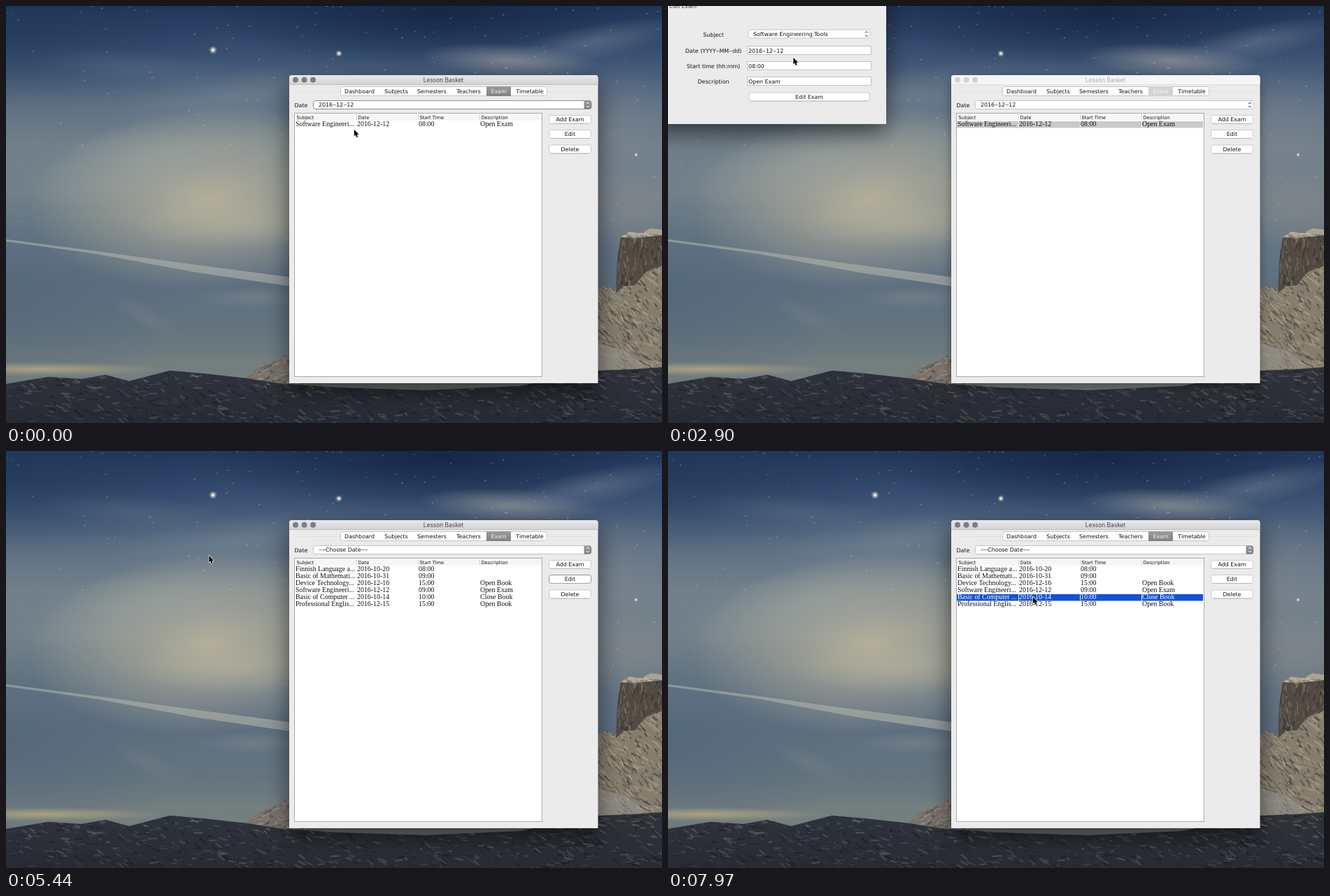
Recreate the animation shown at these times as an HTML page with a canvas. Size 938 by 597 pixels, loop 8000 ms.

```html
<!DOCTYPE html>
<html lang="en">
<head>
<meta charset="utf-8">
<title>Exam planner</title>
<style>
html, body { margin: 0; width: 100%; height: 100%; overflow: hidden; background: #24395a; }
canvas { display: block; width: 938px; height: 597px; }
</style>
</head>
<body>
<canvas id="stage" width="938" height="597"></canvas>
<script>
const W = 938, H = 597, LOOP = 8000;
const stage = document.getElementById('stage');
let ctx = stage.getContext('2d');

const UI = '7.9px "DejaVu Sans", sans-serif';
const HEAD = '6.7px "DejaVu Sans", sans-serif';
const CELL = '9.9px "Liberation Serif", serif';
const TITLE = '8.4px Inter, sans-serif';
const COLS = [414, 502, 590, 678];

const ENGINEERING = ['Software Engineeri...', '2016-12-12', '08:00', 'Open Exam'];
const ALL_EXAMS = [
  ['Finnish Language a...', '2016-10-20', '08:00', ''],
  ['Basic of Mathemati...', '2016-10-31', '09:00', ''],
  ['Device Technology...', '2016-12-16', '15:00', 'Open Book'],
  ['Software Engineeri...', '2016-12-12', '09:00', 'Open Exam'],
  ['Basic of Computer ...', '2016-10-14', '10:00', 'Close Book'],
  ['Professional Englis...', '2016-12-15', '15:00', 'Open Book']
];

// time, x, y, and whether the pointer glides on to the next entry
const POINTER = [
  [0, 497.5, 177], [60, 498, 176], [230, 500, 171], [590, 500, 171, 1],
  [1150, 808, 183], [1430, 620, 170], [1610, 157, 104], [1790, 138, 98, 1],
  [2080, 127, 82], [2610, 127, 80, 1], [2900, 179, 74], [3200, 179, 74, 1],
  [3500, 185, 72, 1], [3840, 184, 73], [4080, 184, 73, 1], [4600, 217, 134, 1],
  [4850, 217.5, 131], [5440, 290, 150, 1], [5550, 552, 219], [5730, 553, 215, 1],
  [6050, 572, 195, 1], [6300, 562, 177, 1], [6490, 558, 181], [6550, 558, 180],
  [6850, 557, 173], [6960, 556, 171], [7110, 556, 171, 1], [7740, 522, 204],
  [7920, 521.5, 206], [7970, 521.5, 209]
];

const between = (t, a, b) => t >= a && t < b;

function random(seed) {
  return () => (seed = (seed * 16807) % 2147483647) / 2147483647;
}

function poly(points) {
  ctx.beginPath();
  points.forEach(([x, y]) => ctx.lineTo(x, y));
  ctx.closePath();
}

function vertical(y0, y1, ...colors) {
  const g = ctx.createLinearGradient(0, y0, 0, y1);
  colors.forEach((c, i) => g.addColorStop(i / (colors.length - 1), c));
  return g;
}

function glow(x, y, rx, ry, rgb, alpha, tilt = 0) {
  ctx.save();
  ctx.translate(x, y);
  ctx.rotate(tilt);
  ctx.scale(rx, ry);
  const g = ctx.createRadialGradient(0, 0, 0, 0, 0, 1);
  g.addColorStop(0, `rgba(${rgb},${alpha})`);
  g.addColorStop(0.5, `rgba(${rgb},${alpha * 0.5})`);
  g.addColorStop(1, `rgba(${rgb},0)`);
  ctx.fillStyle = g;
  ctx.fillRect(-1, -1, 2, 2);
  ctx.restore();
}

// Fills an outline and roughens it with short slanted strokes
function rock(points, base, tones, box, count, slope, seed) {
  const rnd = random(seed), [x, y, w, h] = box;
  ctx.save();
  poly(points);
  ctx.fillStyle = base;
  ctx.fill();
  ctx.clip();
  ctx.globalAlpha = 0.55;
  for (let i = 0; i < count; i++) {
    const px = x + rnd() * w, py = y + rnd() * h, len = 3 + rnd() * 11;
    const a = slope + (rnd() - 0.5) * 0.9;
    ctx.strokeStyle = tones[Math.floor(rnd() * tones.length)];
    ctx.lineWidth = 0.7 + rnd() * 2;
    ctx.beginPath();
    ctx.moveTo(px, py);
    ctx.lineTo(px + Math.cos(a) * len, py + Math.sin(a) * len);
    ctx.stroke();
  }
  ctx.restore();
}

function paintSky() {
  ctx.fillStyle = vertical(0, H, '#21375a', '#385072', '#5b6e82', '#71808a',
    '#72808a', '#657684', '#5e6f80', '#64747f', '#75807f', '#6d7472');
  ctx.fillRect(0, 0, W, H);
  glow(0, 30, 330, 120, '30,54,86', 0.6);
  glow(620, 10, 330, 80, '18,35,66', 0.8);
  glow(0, 420, 260, 150, '75,96,118', 0.5);
  glow(290, 275, 260, 130, '190,183,157', 0.85, -0.08);
  glow(225, 215, 210, 60, '157,164,161', 0.5, -0.2);
  glow(330, 310, 150, 38, '196,188,160', 0.4);
  glow(330, 130, 190, 40, '125,140,151', 0.45, -0.15);
  glow(190, 90, 150, 28, '86,106,131', 0.5, 0.1);
  glow(720, 78, 130, 24, '158,159,156', 0.65, 0.05);
  glow(840, 52, 130, 26, '112,126,145', 0.55, -0.2);
  glow(880, 180, 120, 90, '125,132,144', 0.5);
  glow(900, 290, 110, 60, '142,141,137', 0.5);
  glow(350, 418, 80, 16, '135,143,147', 0.4);
  glow(200, 445, 60, 18, '128,137,143', 0.3, 0.5);
  glow(50, 520, 180, 10, '193,174,132', 0.75);
  glow(300, 508, 170, 12, '132,133,124', 0.4);

  poly([[0, 334], [130, 351], [260, 369], [405, 388], [405, 401], [270, 381], [130, 355], [0, 337]]);
  ctx.fillStyle = 'rgba(176,178,171,0.6)';
  ctx.fill();

  const rnd = random(77);
  for (let i = 0; i < 190; i++) {
    const x = rnd() * W, y = rnd() ** 1.7 * 340;
    ctx.strokeStyle = `rgba(220,226,230,${0.2 + rnd() * 0.5})`;
    ctx.lineWidth = 0.8;
    ctx.beginPath();
    ctx.moveTo(x, y);
    ctx.lineTo(x + 2.5, y - 1.2);
    ctx.stroke();
  }
  [[296, 63, 6], [476, 68, 5], [901, 213, 3]].forEach(([x, y, r]) => {
    glow(x, y, r, r, '245,235,215', 0.9);
    glow(x, y, r / 2, r / 2, '255,250,240', 1);
  });
}

function paintMountains() {
  rock([[340, 535], [364, 516], [385, 508], [405, 497], [450, 500], [450, 550], [340, 550]],
    '#77716a', ['#a39a87', '#403f42', '#8e8679'], [340, 497, 90, 50], 130, -0.5, 5);
  rock([[840, 403], [850, 405], [857, 399], [870, 408], [892, 372], [938, 350], [938, 560], [840, 560]],
    '#857d6d', ['#bbae91', '#3b3837', '#a39981', '#55504b'], [840, 350, 98, 180], 480, 0.75, 21);
  rock([[879, 330], [891, 323], [908, 325], [922, 318], [938, 320], [938, 372],
    [914, 381], [899, 400], [884, 401], [872, 411], [874, 365]],
    '#514a43', ['#8f7f66', '#2d2a2b', '#6d6252'], [870, 328, 68, 85], 150, 1.6, 12);
  rock([[878, 331], [891, 323], [908, 325], [922, 318], [938, 320], [938, 328], [900, 332]],
    '#a9a294', ['#cbc2ae', '#686159'], [876, 318, 62, 14], 24, 0.2, 9);
  rock([[846, 482], [884, 494], [918, 517], [846, 522]],
    '#8e8a81', ['#aaa393', '#6d6962'], [846, 482, 70, 40], 35, 0.6, 4);
  rock([[0, 541], [60, 531], [108, 534], [142, 528], [176, 537], [234, 522], [282, 526],
    [345, 533], [390, 540], [470, 546], [600, 550], [735, 544], [800, 531], [846, 522],
    [900, 520], [938, 517], [938, 597], [0, 597]],
    '#2e323a', ['#5c626a', '#171a21', '#474c54', '#23272e', '#747675'], [0, 518, W, 79], 1050, 0.3, 33);
  ctx.fillStyle = vertical(530, H, 'rgba(20,23,30,0)', 'rgba(20,23,30,0.28)');
  ctx.fillRect(0, 530, W, H - 530);
}

function makeBackdrop() {
  const sheet = document.createElement('canvas'), main = ctx;
  sheet.width = W;
  sheet.height = H;
  ctx = sheet.getContext('2d');
  paintSky();
  paintMountains();
  ctx = main;
  return sheet;
}

// The interface font has a hyphen as wide as a digit
function text(s, x, y, font = UI, color = '#111', align = 'left') {
  ctx.font = font;
  ctx.textAlign = align;
  ctx.fillStyle = color;
  ctx.fillText(font === UI ? s.replace(/-/g, '\u2012') : s, x, y);
}

function box(x, y, w, h, r, fill, stroke) {
  ctx.beginPath();
  ctx.roundRect(x, y, w, h, r);
  ctx.fillStyle = fill;
  ctx.fill();
  if (stroke) {
    ctx.strokeStyle = stroke;
    ctx.lineWidth = 1;
    ctx.stroke();
  }
}

function shell(x, y, w, h, r, active) {
  ctx.save();
  ctx.shadowColor = `rgba(0,0,0,${active ? 0.55 : 0.38})`;
  ctx.shadowBlur = active ? 32 : 14;
  ctx.shadowOffsetY = active ? 12 : 5;
  box(x, y, w, h, r, '#ebebeb');
  ctx.restore();
}

function button(label, x, y, w, { pressed, focus } = {}) {
  const fill = pressed ? vertical(y, y + 13, '#777', '#666', '#858585') : '#fff';
  box(x + 0.5, y + 0.5, w - 1, 12, 3, fill, pressed ? '#555' : focus ? '#929292' : '#cacaca');
  if (!pressed) {
    ctx.fillStyle = '#adadad';
    ctx.fillRect(x + 3, y + 12.3, w - 6, 0.7);
  }
  text(label, x + w / 2, y + 9.4, UI, '#111', 'center');
}

function chevrons(x, y, color) {
  ctx.strokeStyle = color;
  ctx.lineWidth = 1;
  [-1, 1].forEach(d => {
    ctx.beginPath();
    ctx.moveTo(x - 2, y + d * 1.5);
    ctx.lineTo(x, y + d * 3.5);
    ctx.lineTo(x + 2, y + d * 1.5);
    ctx.stroke();
  });
}

function combo(label, x, y, w, { focus, active } = {}) {
  box(x + 0.5, y + 0.5, w - 1, 12, 3, '#fff', focus ? '#8c8c8c' : '#c4c4c4');
  if (active) box(x + w - 11, y + 0.5, 10.5, 12, [0, 3, 3, 0], vertical(y, y + 13, '#9a9a9a', '#808080'));
  chevrons(x + w - 5.5, y + 6.5, active ? '#fff' : '#333');
  text(label, x + 8, y + 9.3);
}

function tabs(active) {
  ctx.fillStyle = '#dfdfdf';
  ctx.fillRect(412, 122, 426, 1);
  box(478.5, 115.5, 295, 13, 3, '#fff', '#c6c6c6');
  ctx.fillStyle = active ? vertical(115, 129, '#9b9b9b', '#818181') : '#d3d3d3';
  ctx.fillRect(687, 115, 35, 14);
  const names = ['Dashboard', 'Subjects', 'Semesters', 'Teachers', 'Exam', 'Timetable'];
  const centers = [505.5, 558, 609, 661.5, 704.5, 749];
  names.forEach((n, i) => text(n, centers[i], 124.9, UI, n === 'Exam' ? '#f4f4f4' : '#111', 'center'));
}

function table(rows, selected, active) {
  ctx.fillStyle = '#fff';
  ctx.fillRect(412, 153, 355, 378);
  ctx.fillStyle = '#f6f6f6';
  ctx.fillRect(413, 154, 353, 10);
  ctx.strokeStyle = '#ababab';
  ctx.lineWidth = 1;
  ctx.strokeRect(412.5, 153.5, 354, 377);
  ['Subject', 'Date', 'Start Time', 'Description'].forEach((n, i) => {
    text(n, COLS[i] + 1.4, 162, HEAD);
    ctx.fillStyle = '#d4d4d4';
    if (i) ctx.fillRect(COLS[i] - 1, 155, 1, 8);
  });
  rows.forEach((row, r) => {
    const y = 165 + r * 10, on = r === selected;
    if (on) {
      ctx.fillStyle = active ? '#1153d4' : '#c9c9c9';
      ctx.fillRect(413, y, 352, 9.5);
    }
    row.forEach((cell, i) => {
      if (on && i) {
        ctx.fillStyle = active ? '#dce6fa' : '#eee';
        ctx.fillRect(COLS[i] - 1, y, 1, 9.5);
      }
      text(cell, COLS[i], y + 7.3, CELL, on && active ? '#fff' : '#111');
    });
  });
}

function planner(t) {
  const framed = !between(t, 1340, 5260);
  const active = !between(t, 1430, 5260);
  const saved = t >= 5260;
  shell(405, 99, 441.5, 441, [4, 4, 0, 0], framed);
  box(405, 99, 441.5, 13.5, [4, 4, 0, 0], framed ? vertical(99, 113, '#e8e8e8', '#d2d2d2') : '#f5f5f5');
  ctx.fillStyle = framed ? '#b9b9b9' : '#dadada';
  ctx.fillRect(405, 112, 441.5, 0.8);
  [414, 426.5, 439].forEach(x => {
    ctx.beginPath();
    ctx.arc(x, 105.7, 4, 0, 7);
    ctx.fillStyle = framed ? '#7d7d7d' : '#d2d2d2';
    ctx.fill();
  });
  text('Lesson Basket', 625.5, 109, TITLE, framed ? '#444' : '#aaa', 'center');

  tabs(active);
  text('Date', 412.5, 144.9);
  combo(saved ? '--Choose Date--' : '2016-12-12', 439, 135, 398.5, { active, focus: t < 590 });

  let selected = -1;
  if (between(t, 590, 5260) || between(t, 6850, 7740)) selected = 0;
  else if (t >= 7740) selected = 4;
  table(saved ? ALL_EXAMS : [ENGINEERING], selected, active);

  button('Add Exam', 776, 156, 61);
  button('Edit', 776, 177, 61, { pressed: between(t, 1220, 1430), focus: between(t, 5260, 6850) });
  button('Delete', 776, 198.5, 61);
}

function field(value, y) {
  box(113.5, y + 0.5, 177, 12, 0, '#fff', '#c3c3c3');
  text(value, 115, y + 9.6);
}

function dialog(t) {
  if (!between(t, 1340, 5260)) return;
  shell(-20, -40, 332, 209, 0, true);
  if (t < 1430) return;
  text('Edit Exam', 2, 3, TITLE, '#444');
  ['Subject', 'Date (YYYY-MM-dd)', 'Start time (hh:mm)', 'Description'].forEach((n, i) =>
    text(n, 65, [44, 66.8, 88.8, 110.8][i], UI, '#111', 'center'));
  combo('Software Engineering Tools', 114, 33.5, 175.5, { focus: t < 2110 });
  field('2016-12-12', 57);
  field(t < 3350 ? '08:00' : t < 3470 ? '0:00' : '09:00', 79);
  field('Open Exam', 101);
  if (between(t, 2110, 2610) || between(t, 3200, 4080) || between(t, 4470, 4970)) {
    ctx.fillStyle = '#000';
    ctx.fillRect(between(t, 3350, 3470) ? 120 : 125, 80, 1, 11);
  }
  button('Edit Exam', 115, 123.5, 174, { pressed: between(t, 5150, 5260) });
}

function pointerAt(t) {
  const i = POINTER.findLastIndex(k => k[0] <= t);
  const [t0, x, y, glide] = POINTER[i];
  if (!glide) return [x, y];
  const [t1, x1, y1] = POINTER[i + 1];
  const p = Math.floor((t - t0) / 68) * 68 / (t1 - t0);
  const e = p * p * (3 - 2 * p);
  return [x + (x1 - x) * e, y + (y1 - y) * e];
}

function pointer(t) {
  ctx.save();
  ctx.translate(...pointerAt(t));
  poly([[0.3, 0], [0.3, 9.3], [2.4, 7.5], [3.8, 10.9], [5.6, 10.2], [4.2, 6.9], [7, 6.7]]);
  ctx.lineJoin = 'round';
  ctx.lineWidth = 1.3;
  ctx.strokeStyle = '#fff';
  ctx.stroke();
  ctx.fillStyle = '#000';
  ctx.fill();
  ctx.restore();
}

const backdrop = makeBackdrop();

function draw(now) {
  const t = now % LOOP;
  ctx.drawImage(backdrop, 0, 0);
  planner(t);
  dialog(t);
  pointer(t);
  requestAnimationFrame(draw);
}
requestAnimationFrame(draw);
</script>
</body>
</html>
```
